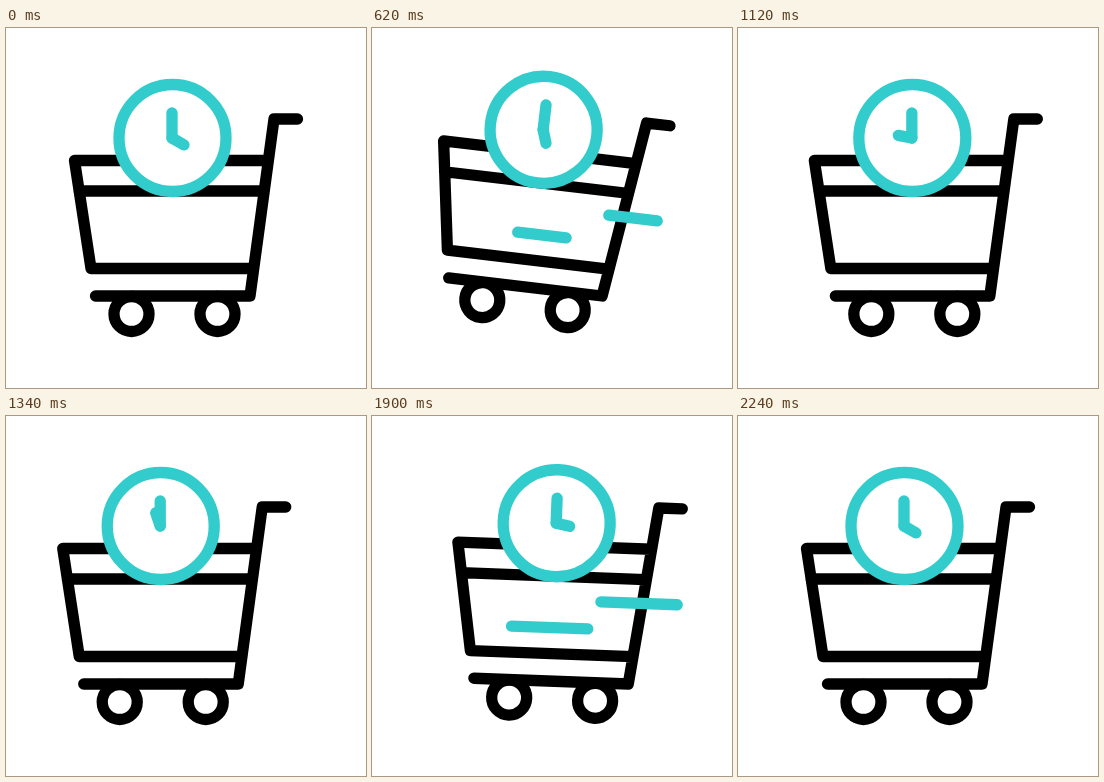
Write an HTML page that moves like this. It is 360 px wide and 360 px high and loops after 2400 ms.

```html
<!DOCTYPE html>
<html lang="en">
<head>
<meta charset="utf-8">
<title>Shopping cart with clock</title>
<style>
  html, body { margin: 0; width: 100%; height: 100%; overflow: hidden; background: #fff; }
  svg { display: block; width: 100vw; height: 100vh; }
  g { fill: none; stroke-width: 11.3; stroke-linecap: round; stroke-linejoin: round; }
</style>
</head>
<body>
<svg viewBox="0 0 360 360">
  <g id="cart" stroke="#000">
    <path d="M291.5 91H268L244 268H89.500M262 132.500H68.500L85 240.500H247M73 163H257"/>
    <circle cx="125.500" cy="286" r="17.500"/>
    <circle cx="211.500" cy="286" r="17.500"/>
    <g id="clock" stroke="#33cccc">
      <circle cx="166.500" cy="110" r="53.500" fill="#fff"/>
      <path d="M166 85V110"/>
      <path id="hour" d="M166 110V96.200"/>
    </g>
    <path id="lines" stroke="#33cccc"/>
  </g>
</svg>
<script>
const LOOP = 2400;
const [cart, clock, hour, lines] =
  ["cart", "clock", "hour", "lines"].map(id => document.getElementById(id));

// Keys are [time, value] pairs, eased in and out between neighbours.
const shiftKeys = [[200, 0], [680, -14.5], [980, 15], [1415, -14], [1800, 15], [2170, 0]];
const tiltKeys = [[200, 0], [680, 7], [820, 0], [1800, 0], [1980, 3.6], [2170, 0]];
const hopKeys = [[615, 0], [700, 17], [1100, 0]];
const hourKeys = [[206, 120], [2175, 480]];
const tailKeys = [[500, 0], [707, 78], [1000, 78], [1001, 0], [1700, 0], [1920, 78]];
const headKeys = [[707, 0], [880, 78], [1000, 78], [1001, 0], [1920, 0], [2140, 78]];

function at(keys, t) {
  const i = keys.findIndex(k => k[0] > t);
  if (i < 0) return keys[keys.length - 1][1];
  if (i === 0) return keys[0][1];
  const [t0, v0] = keys[i - 1], [t1, v1] = keys[i];
  const u = (t - t0) / (t1 - t0);
  return v0 + (v1 - v0) * u * u * (3 - 2 * u);
}

function speedLines(t) {
  const tail = at(tailKeys, t), head = at(headKeys, t);
  if (tail - head < 0.5) return "";
  const line = (x, y) => `M${x - head} ${y}H${x - tail}`;
  return line(201.5, 214.5) + line(290, 187);
}

function draw(now) {
  const t = now % LOOP;
  cart.setAttribute("transform",
    `translate(${at(shiftKeys, t)} 0) rotate(${at(tiltKeys, t)} 244 268)`);
  clock.setAttribute("transform", `translate(0 ${-at(hopKeys, t)})`);
  hour.setAttribute("transform", `rotate(${at(hourKeys, t)} 166 110)`);
  lines.setAttribute("d", speedLines(t));
}

const start = performance.now();
function frame() {
  draw(performance.now() - start);
  requestAnimationFrame(frame);
}
frame();
</script>
</body>
</html>
```
